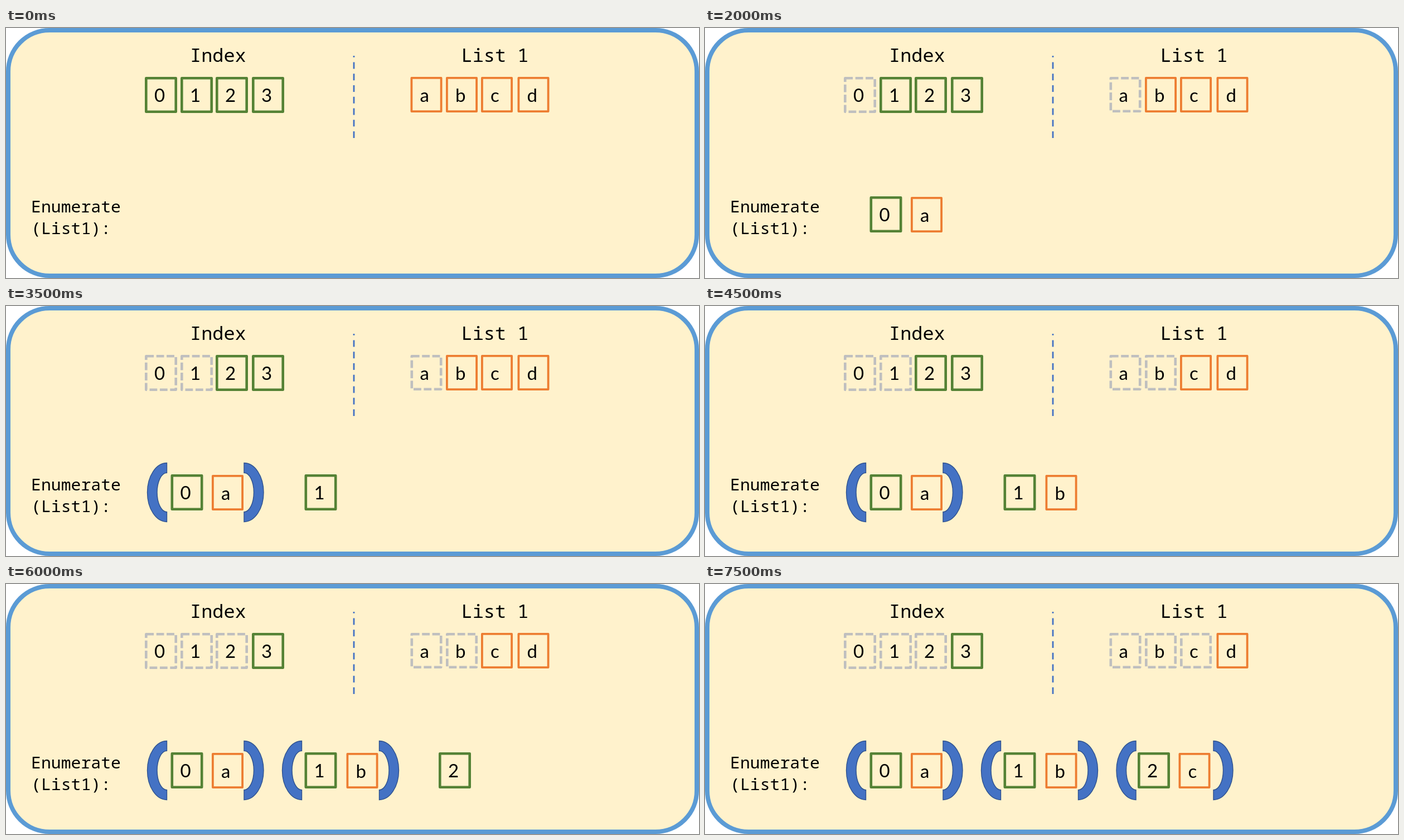
Write an HTML page with a canvas that moves like this. It is 1243 px wide and 450 px high and loops after 8 s.

```html
<!DOCTYPE html>
<html lang="en">
<head>
<meta charset="utf-8">
<title>Enumerate</title>
<style>
  html, body { margin: 0; width: 100%; height: 100%; overflow: hidden; background: #fff; }
  canvas { display: block; }
</style>
</head>
<body>
<canvas id="stage" width="1243" height="450"></canvas>
<script>
const ctx = document.getElementById("stage").getContext("2d");
const LOOP = 8000, STEP = 500, STEPS_PER_PAIR = 5;
const MONO = '"Noto Sans Mono", "DejaVu Sans Mono", monospace';
const SANS = 'Lato, "Open Sans", sans-serif';
const GREY = "#bfbfbf";

// Each place is the outer top-left corner of a tile.
const numbers = {
  color: "#548235", line: 4.6, w: 58, h: 65, labels: "0123",
  home: [[249, 88], [313, 88], [376, 88], [441, 88]],
  mid: [[294.5, 212], [467, 204], [541, 176]],
  end: [[295.5, 303], [535.5, 303], [776, 303]]
};
const letters = {
  color: "#ed7d31", line: 3.8, w: 57, h: 64, labels: "abcd",
  home: [[725.5, 88], [789, 88], [852, 88], [917.5, 88]],
  mid: [[540, 228.5], [725, 226], [862, 210]],
  end: [[369, 304], [610.5, 304], [849.5, 304]]
};
const brackets = [[288.5, 427], [530.5, 669.5], [773, 912]];

function text(str, x, y, size, family) {
  ctx.font = `${size}px ${family}`;
  ctx.fillStyle = "#000";
  ctx.fillText(str, x, y);
}

function tile(set, i, [x, y], used) {
  const line = used ? 4.6 : set.line;
  ctx.lineWidth = line;
  ctx.lineJoin = "round";
  ctx.strokeStyle = used ? GREY : set.color;
  ctx.setLineDash(used ? [13.8, 4.6] : []);
  ctx.strokeRect(x + line / 2, y + line / 2, set.w - line, set.h - line);
  ctx.setLineDash([]);
  text(set.labels[i], x + 16.9, y + 44.5, 33, SANS);
}

function row(set, firstStep, step) {
  set.home.forEach((place, i) => {
    const age = step - firstStep - i * STEPS_PER_PAIR;
    const moved = age >= 0 && i < set.end.length;
    tile(set, i, place, moved);
    if (moved) tile(set, i, age === 0 ? set.mid[i] : set.end[i], false);
  });
}

// Half ring with its flat ends at x; side is -1 for "(" and 1 for ")".
function bracket(x, side) {
  const top = -Math.PI / 2, bottom = Math.PI / 2, left = side < 0;
  ctx.beginPath();
  ctx.ellipse(x, 335.5, 35, 53, 0, top, bottom, left);
  ctx.ellipse(x, 335.5, 17.5, 35.2, 0, bottom, top, !left);
  ctx.closePath();
  ctx.fillStyle = "#4472c4";
  ctx.fill();
  ctx.lineWidth = 1.4;
  ctx.lineJoin = "miter";
  ctx.strokeStyle = "#2f528f";
  ctx.stroke();
}

function panel() {
  ctx.fillStyle = "#fff";
  ctx.fillRect(0, 0, 1243, 450);
  ctx.beginPath();
  ctx.roundRect(4, 4, 1235, 442, 74);
  ctx.fillStyle = "#fff2cc";
  ctx.fill();
  ctx.lineWidth = 8;
  ctx.strokeStyle = "#5b9bd5";
  ctx.stroke();

  ctx.beginPath();
  ctx.moveTo(624, 198);
  ctx.lineTo(624, 50);
  ctx.lineWidth = 2.8;
  ctx.strokeStyle = "#4472c4";
  ctx.setLineDash([12, 8.75]);
  ctx.stroke();
  ctx.setLineDash([]);

  text("Index", 330, 61, 33.6, MONO);
  text("List 1", 816.5, 61, 33.6, MONO);
  text("Enumerate", 45, 331.5, 29.8, MONO);
  text("(List1):", 45, 370.5, 29.8, MONO);
}

function draw(now) {
  const step = Math.floor((now % LOOP) / STEP);
  panel();
  row(numbers, 1, step);
  row(letters, 3, step);
  brackets.forEach(([open, close], i) => {
    if (step < (i + 1) * STEPS_PER_PAIR) return;
    bracket(open, -1);
    bracket(close, 1);
  });
}

const start = performance.now();
function tick() {
  draw(performance.now() - start);
  requestAnimationFrame(tick);
}
tick();
</script>
</body>
</html>
```
